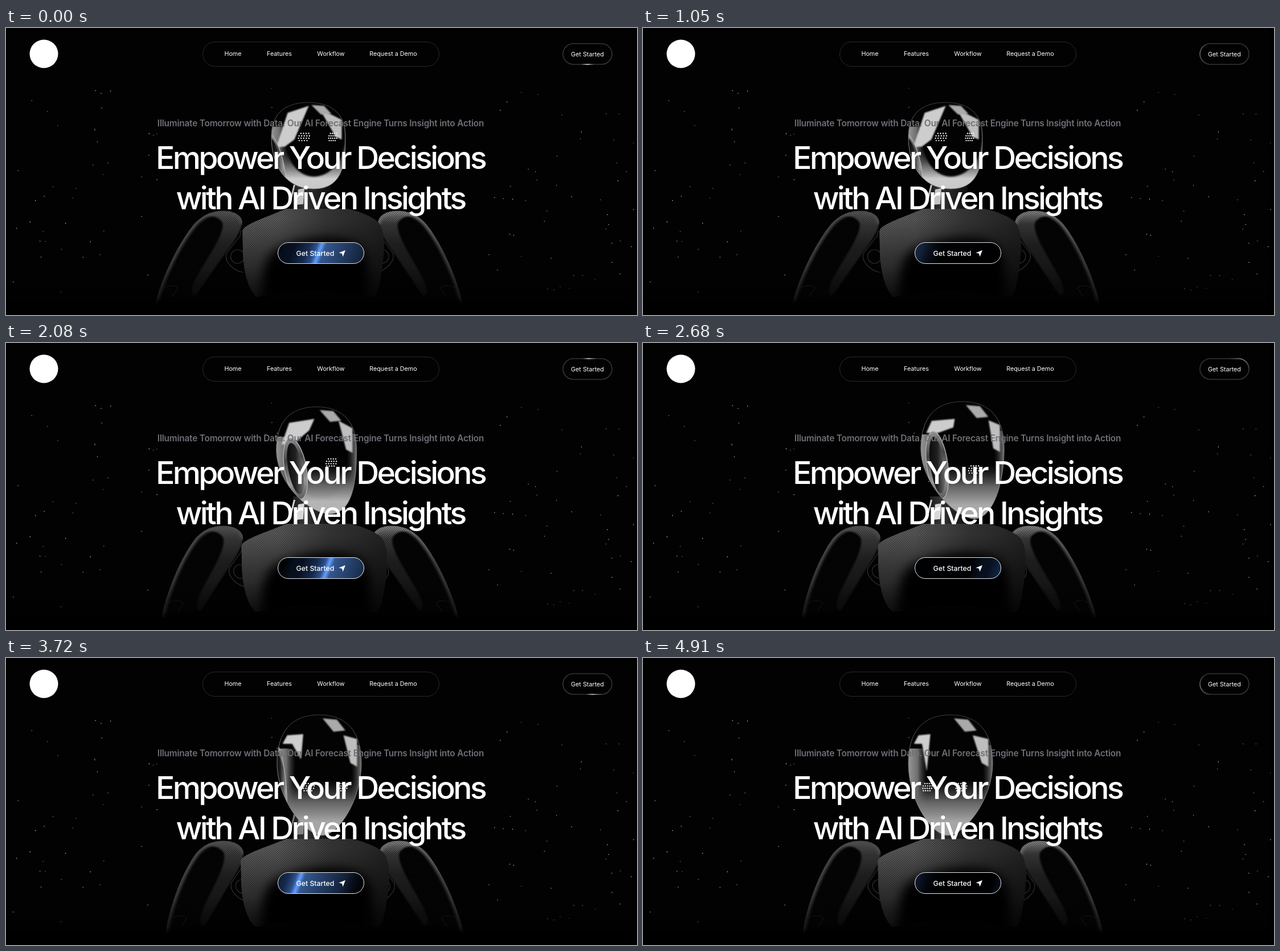
Recreate the animation shown at these times as an HTML page with a canvas. Size 1108x505 px, loop 4.93 s.

```html
<!DOCTYPE html>
<html lang="en">
<head>
<meta charset="utf-8">
<title>Forecast engine hero</title>
<style>
  html, body { margin: 0; width: 1108px; height: 505px; overflow: hidden; background: #000; }
  canvas, svg { position: absolute; left: 0; top: 0; }
  text { font-family: Inter, sans-serif; font-optical-sizing: none; fill: #fff; text-anchor: middle; }
  .small { font-size: 10.77px; }
  .lead { font-size: 15.39px; font-weight: 600; letter-spacing: -.0125em; fill: #6f6f76; }
  .title { font-size: 55.4px; font-weight: 500; letter-spacing: -.066em; }
  .action { font-size: 12.3px; font-weight: 500; }
</style>
</head>
<body>
<canvas id="scene" width="1108" height="505"></canvas>
<svg width="1108" height="505" fill="none">
  <circle cx="66.5" cy="45.5" r="25" fill="#fff"/>
  <rect x="345.5" y="24.5" width="415" height="43" rx="21.5" stroke="#292929"/>
  <g class="small">
    <text x="398.5" y="49">Home</text>
    <text x="480" y="49">Features</text>
    <text x="570.5" y="49">Workflow</text>
    <text x="680" y="49">Request a Demo</text>
    <text x="1021" y="50">Get Started</text>
  </g>
  <text class="lead" x="552.5" y="173">Illuminate Tomorrow with Data. Our AI Forecast Engine Turns Insight into Action</text>
  <text class="title" x="552" y="248">Empower Your Decisions</text>
  <text class="title" x="552" y="319">with AI Driven Insights</text>
  <rect x="477.5" y="377.5" width="151" height="37" rx="18.5" stroke="#e8e8e8"/>
  <text class="action" x="543" y="401">Get Started</text>
  <path d="M584.5 395.5L596 391L591.5 402.5L590 397Z" fill="#fff"/>
</svg>
<script>
const LOOP = 4930, STEP = 148.85;
const ctx = document.getElementById('scene').getContext('2d');

// The robot's look: time, head x, yaw in radians, pitch (1 = looking up).
const looks = [
  [1050, 531, .3, 1],
  [2080, 545, .8, .4],
  [2680, 561, .7, .1],
  [3720, 550, .17, 0],
  [4320, 540, -.16, 0]
];

const torso = new Path2D('M415 357C418 345 450 336 492 318L600 318C622 322 645 332 655 342C668 358 666 390 662 420' +
  'C658 445 655 472 645 473C560 460 520 460 440 473C425 460 418 430 416 400Z');
const chest = new Path2D('M448 490C451 440 446 405 480 386C520 368 590 362 618 380C642 398 637 440 637 490Z');
const arm = new Path2D('M263 486C273 443 300 385 325 352C342 328 365 320 388 322C405 324 416 332 415 345' +
  'C412 365 390 390 372 417C357 440 343 462 331 473L290 473Z');
const armRim = new Path2D('M263 486C273 443 300 385 325 352C342 328 365 320 388 322C405 324 416 332 415 345');
const sleeve = new Path2D('M345 332C362 321 390 320 408 329C420 340 414 355 398 380C375 412 350 445 335 471' +
  'C322 472 325 455 340 430C360 395 385 360 380 342C372 330 360 330 345 332Z');
const elbow = new Path2D('M268 462C285 451 299 452 303 458L292 473');
const joint = new Path2D('M413 356L411 366L388 396C382 410 400 428 418 430M419 402A12 12 0 1 1 395 402' +
  'A12 12 0 1 1 419 402M404 365L384 394');

const grey = (v, a = 1) => `rgba(${v},${v},${v},${a})`;

function gradient(x0, y0, x1, y1, ...stops) {
  const g = ctx.createLinearGradient(x0, y0, x1, y1);
  stops.forEach(([at, color]) => g.addColorStop(at, color));
  return g;
}

function seeded(seed) {
  return () => (seed = seed * 16807 % 2147483647) / 2147483647;
}

function makeWeave() {
  const tile = document.createElement('canvas');
  tile.width = tile.height = 4;
  const c = tile.getContext('2d');
  c.fillStyle = 'rgba(0,0,0,.4)';
  c.fillRect(0, 0, 2, 1);
  c.fillRect(2, 2, 2, 1);
  return ctx.createPattern(tile, 'repeat');
}
const weave = makeWeave();

function within(path, draw) {
  ctx.save();
  ctx.clip(path);
  draw();
  ctx.restore();
}

function blurred(radius, draw) {
  ctx.save();
  ctx.filter = `blur(${radius}px)`;
  draw();
  ctx.restore();
}

function lookAt(t) {
  let k = 0;
  while (k < looks.length - 2 && t > looks[k + 1][0]) k++;
  const [from, to] = [looks[k], looks[k + 1]];
  const p = Math.min(1, Math.max(0, (t - from[0]) / (to[0] - from[0])));
  const [, cx, yaw, pitch] = from.map((v, i) => v + (to[i] - v) * p);
  return { cx, yaw, pitch };
}

// Stars fill both sides of the stage and leave the middle nearly empty.
function drawStars() {
  const random = seeded(71);
  for (let i = 0; i < 100; i++) {
    const reach = 265 * random() + (i % 12 ? 0 : 250);
    const x = i % 2 ? 1106 - reach : reach, y = 97 + 372 * random();
    ctx.fillStyle = grey(90 + 140 * random());
    ctx.fillRect(x, y, 1.3, 1.3);
  }
}

function drawTorso(pitch) {
  const left = 412 + 3 * pitch, right = 672 - 9 * pitch, scale = (right - left) / 249;
  ctx.save();
  ctx.transform(scale, 0, 0, 1, left - 415 * scale, 0);
  within(torso, () => {
    ctx.fillStyle = gradient(415, 0, 665, 0, [0, grey(92)], [.25, grey(88)], [.6, grey(56)], [1, grey(36)]);
    ctx.fill(torso);
    ctx.fillStyle = weave;
    ctx.fill(torso);
    ctx.fillStyle = '#000';
    blurred(9, () => ctx.fill(chest));
    ctx.fillStyle = gradient(0, 335, 0, 473, [0, grey(0, 0)], [.5, grey(0, .4)], [1, grey(0, .7)]);
    ctx.fill(torso);
  });
  ctx.restore();
}

// Draws the left arm; the hand swings by a shear about the shoulder.
function drawArm(swing, light) {
  const k = swing / 164;
  ctx.save();
  ctx.transform(1, 0, -k, 1, k * 322, 0);
  ctx.lineWidth = 1.2;
  ctx.strokeStyle = grey(46);
  ctx.stroke(joint);
  ctx.fillStyle = '#040404';
  ctx.fill(arm);
  within(arm, () => {
    ctx.fillStyle = gradient(0, 322, 0, 472, [0, grey(light)], [.15, grey(56)], [.4, grey(32)], [1, grey(16)]);
    blurred(1.5, () => ctx.fill(sleeve));
    ctx.lineWidth = 10;
    ctx.strokeStyle = gradient(0, 322, 0, 486, [0, grey(light)], [.4, grey(72)], [1, grey(40)]);
    blurred(2, () => ctx.stroke(armRim));
    ctx.fillStyle = weave;
    ctx.fill(arm);
  });
  ctx.lineWidth = 1;
  ctx.strokeStyle = grey(30);
  ctx.stroke(elbow);
  ctx.restore();
}

function drawNeck(yaw) {
  ctx.fillStyle = gradient(500, 0, 575, 0, [0, '#191919'], [.3, '#333'], [1, '#0b0b0b']);
  ctx.fillRect(504, 270, 66, 51);
  ctx.fillStyle = grey(215, Math.min(1, Math.max(0, yaw * 3)));
  ctx.fill(new Path2D('M513 284L524 282L522 310L510 311ZM505 276L508 276L500 308L497 308Z'));
}

// Skull outline; the chin follows the yaw and broadens when looking up.
function skullPath(cx, top, w, h, yaw, pitch) {
  const path = new Path2D(), bottom = top + h, mid = top + h * .4, chin = cx + 30 * yaw;
  const jaw = w * (.2 + .2 * pitch), low = top + h * .7, brow = top + h * .15;
  path.moveTo(cx, top);
  path.bezierCurveTo(cx + w * .34, top, cx + w / 2, brow, cx + w / 2, mid);
  path.bezierCurveTo(cx + w / 2, low, chin + jaw, bottom, chin, bottom);
  path.bezierCurveTo(chin - jaw, bottom, cx - w / 2, low, cx - w / 2, mid);
  path.bezierCurveTo(cx - w / 2, brow, cx - w * .34, top, cx, top);
  return path;
}

function ellipse(...shape) {
  ctx.beginPath();
  ctx.ellipse(...shape, 0, 7);
  ctx.fill();
}

function drawEye(x, y, squeeze) {
  ctx.fillStyle = '#eee';
  for (let row = -1.5; row < 2; row++) {
    const count = Math.abs(row) > 1 ? 4 : 5;
    for (let i = 0; i < count; i++) {
      ellipse(x + ((i - (count - 1) / 2) * 4.6 - row) * squeeze, y + row * 4.2, 1.2, 1.2, 0);
    }
  }
}

function drawEar(x, y, rx, ry, tilt) {
  ctx.fillStyle = gradient(x - rx, y - ry, x + rx, y + ry, [0, '#999'], [.35, '#444'], [.7, '#999'], [1, '#555']);
  ellipse(x, y, rx, ry, tilt);
  ctx.strokeStyle = '#b4b4b4';
  ctx.lineWidth = 1.3;
  ctx.stroke();
  ctx.fillStyle = gradient(x - rx, 0, x + rx, 0, [0, '#060606'], [.5, '#202020'], [1, '#888']);
  ellipse(x, y, rx * .66, ry * .84, tilt);
}

function drawHead({ cx, yaw, pitch }) {
  const top = 100 + 31 * pitch, w = 148 - 18 * pitch, h = 212 - 60 * pitch;
  const l = cx - w / 2, r = cx + w / 2, bottom = top + h;
  const skull = skullPath(cx, top, w, h, yaw, pitch);
  const at = (u, v) => [cx + u * w / 2, top + v * h];
  const onFace = longitude => Math.sin(yaw + longitude);

  // Soft reflection with corners in skull coordinates.
  const reflect = (tone, ...corners) => blurred(1.3, () => {
    ctx.fillStyle = grey(tone);
    ctx.beginPath();
    corners.forEach(([u, v]) => ctx.lineTo(...at(u, v)));
    ctx.fill();
  });

  ctx.fillStyle = '#030303';
  ctx.fill(skull);
  within(skull, () => {
    ctx.fillStyle = gradient(l, 0, l + w * .22, 0, [0, grey(150)], [.5, grey(110)], [1, grey(60, 0)]);
    ctx.fillRect(l, top + h * .28, w * .22, h);
    ctx.fillStyle = gradient(r, 0, r - w * .12, 0, [0, grey(120)], [1, grey(60, 0)]);
    ctx.fillRect(r - w * .12, top + h * .25, w * .12, h);
    const jaw = top + h * .54;
    ctx.fillStyle = gradient(0, jaw, 0, bottom, [0, grey(70, 0)], [.4, grey(110, .9)],
      [.75, grey(165 + 40 * pitch)], [1, grey(165 + 35 * pitch)]);
    ctx.fillRect(l, jaw, w, h);
    ctx.fillStyle = grey(3, Math.max(0, pitch * 1.6 - .6));
    blurred(1.5, () => ellipse(...at(.2, .42), w * .4, h * .44, .12));

    reflect(205, [-.87, .24 + .28 * pitch], [-.76 + .2 * pitch, .17 - .05 * pitch],
      [-.43 + .3 * yaw + .35 * pitch, .16 - .12 * pitch], [-.5 + .4 * yaw, .42 - .3 * yaw + .1 * pitch],
      [-.66 + .1 * yaw, .24 + .27 * pitch]);
    reflect(190, [.55 + .15 * yaw - .3 * pitch, .17 - .1 * pitch], [.9, .2], [.9, .43], [.74, .4]);
    reflect(170, [.08, .03], [.42, .04], [.62, .13], [.34, .14]);

    drawEar(...at(onFace(-1.35), .53 + .12 * pitch), w * .16 * Math.cos(yaw - 1.35), h * .29, -.12 - .15 * pitch);
    for (const side of [-.42, .42]) {
      if (onFace(side) < .8) drawEye(...at(onFace(side), .6 - .2 * pitch), Math.cos(yaw + side));
    }
  });
  ctx.strokeStyle = gradient(0, top, 0, bottom, [0, grey(60)], [.4, grey(120)], [1, grey(140)]);
  ctx.lineWidth = 1;
  ctx.stroke(skull);
}

function drawRobot(look) {
  const { yaw, pitch } = look, shoulder = 9 - 20 * yaw;
  drawArm(18 * pitch - 17, 85);
  ctx.save();
  ctx.transform(-1, 0, 0, 1, 1066 + shoulder, 0);
  drawArm(-3 - shoulder / 3, 125);
  ctx.restore();
  drawNeck(yaw);
  drawTorso(pitch);
  drawHead(look);
  ctx.fillStyle = gradient(0, 420, 0, 486, [0, grey(0, 0)], [.8, grey(0, .4)], [1, '#000']);
  ctx.fillRect(0, 420, 1108, 85);
}

function pill(x, y, w, h) {
  const path = new Path2D();
  path.roundRect(x, y, w, h, h / 2);
  return path;
}
const actionPill = pill(477, 377, 152, 38), startPill = pill(978, 27.5, 86, 36.5);

// A slanted beam crosses the button, with a long tail behind it.
function drawShimmer(t) {
  within(actionPill, () => {
    ctx.fillStyle = '#000103';
    ctx.fill(actionPill);
    ctx.transform(1, 0, -.364, 1, 396 * .364, 0);
    const x = 549 + t * 300 / 1980 % 300;
    for (const beam of [x, x - 300]) {
      ctx.fillStyle = gradient(beam - 80, 0, beam + 120, 0, [0, 'rgba(20,36,66,0)'], [.16, '#071020'],
        [.29, '#162a4c'], [.36, '#2c4f8c'], [.4, '#639efb'], [.44, '#33578f'], [.56, '#284470'],
        [.8, '#132138'], [1, 'rgba(4,10,20,0)']);
      ctx.fillRect(beam - 80, 370, 200, 52);
    }
  });
}

// A light circles the border once in four seconds, strongest at top and bottom.
function drawOrbit(t) {
  const angle = Math.PI / 2 + t / 4000 * Math.PI * 2;
  const light = ctx.createConicGradient(angle - Math.PI, 1021, 45.75);
  light.addColorStop(.41, grey(255, 0));
  light.addColorStop(.5, grey(255, .25 + .65 * Math.sin(angle) ** 2));
  light.addColorStop(.59, grey(255, 0));
  ctx.lineWidth = 1.6;
  for (const style of ['#343434', light]) {
    ctx.strokeStyle = style;
    ctx.stroke(startPill);
  }
}

function render(now) {
  const t = Math.floor(now % LOOP / STEP + .03) * STEP;
  ctx.fillStyle = '#000';
  ctx.fillRect(0, 0, 1108, 505);
  ctx.fillStyle = '#020203';
  ctx.fillRect(1, 0, 1098, 484);
  drawStars();
  drawRobot(lookAt(t));
  drawShimmer(t);
  drawOrbit(t);
  requestAnimationFrame(render);
}
requestAnimationFrame(render);
</script>
</body>
</html>
```
